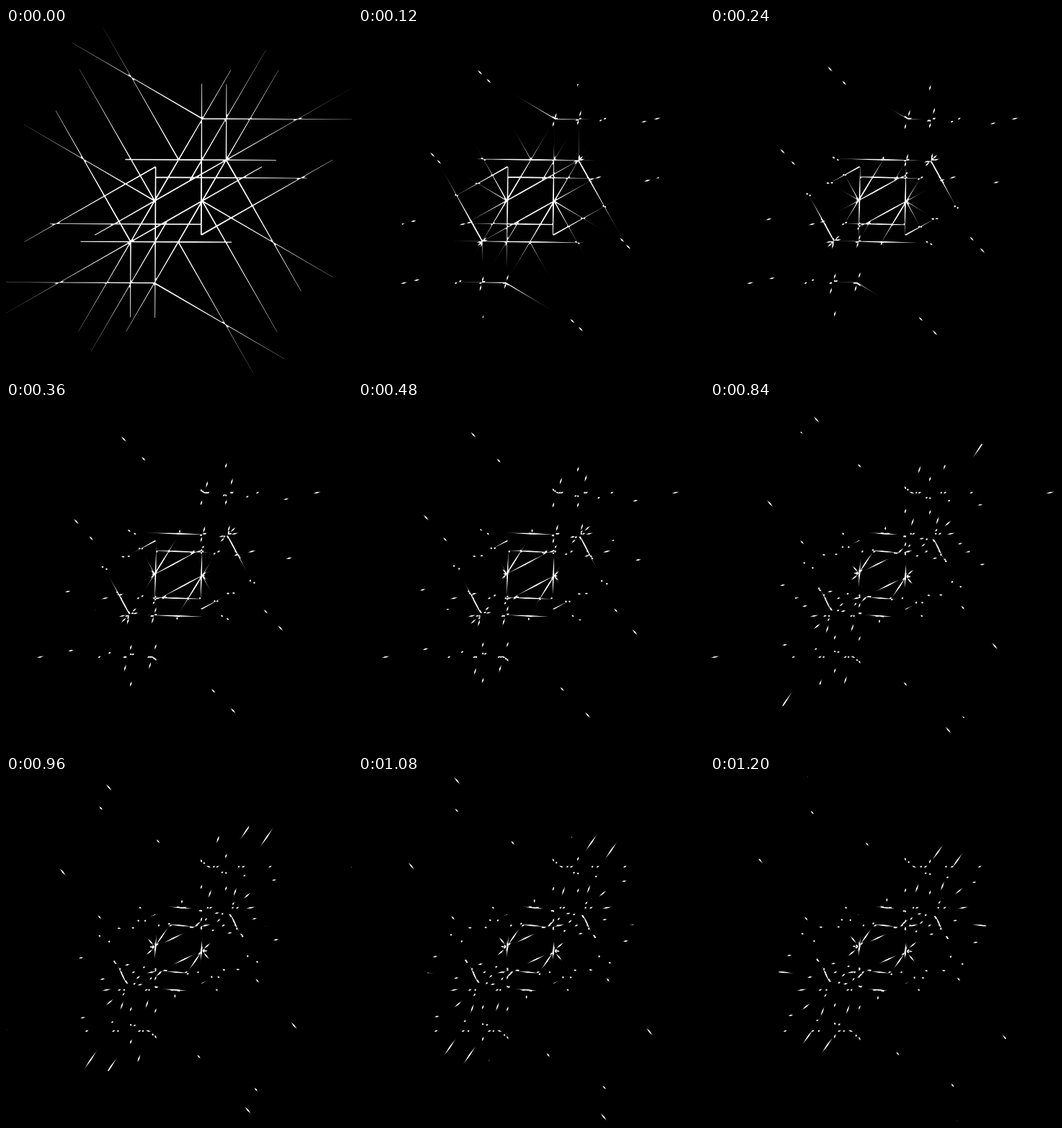
Recreate the animation shown at these times as an HTML page with a canvas. Size 480 by 480 pixels, loop 1260 ms.

```html
<!DOCTYPE html>
<html>
<head>
<meta charset="utf-8">
<style>
  html, body { margin: 0; width: 100%; height: 100%; overflow: hidden; background: #000; }
  canvas { display: block; width: 480px; height: 480px; }
</style>
</head>
<body>
<canvas id="stage" width="480" height="480"></canvas>
<script>
const SIZE = 480, STEP_MS = 60, STEPS = 21;
const CENTER_X = 239.2, CENTER_Y = 239.8;
const LINE_WIDTH = 2.1;
const REACH = 210;              // length of every spoke
const U = 33, H = 57;           // half side and height of the triangular lattice
const SPOKE_ANGLE = Math.PI / 6;

const figure = new Path2D();

// Adds spokes from one point, each direction counted in twelfths of a turn,
// together with their twins turned by half a turn.
function fan(x, y, directions, length = REACH) {
  for (const direction of directions) {
    const endX = x + length * Math.cos(direction * SPOKE_ANGLE);
    const endY = y + length * Math.sin(direction * SPOKE_ANGLE);
    for (const side of [1, -1]) {
      figure.moveTo(side * x, side * y);
      figure.lineTo(side * endX, side * endY);
    }
  }
}

// Hubs on the lattice
fan(-U, 0, [4, 7, 8, 10]);
fan(0, -H, [8]);
fan(2 * U, -H, [2, 5, 11]);
fan(2 * U, -H, [9], REACH / 2);
fan(U, -2 * H, [0, 7]);

// Inner frame and the long bars crossing it
const inner = U - 1.2;
fan(-inner, -47.2, [3, 5]);
fan(-inner, -inner - 0.6, [0]);
fan(U / 2 - 1, -H / 2 + 0.6, [10]);
fan(-2.25 * U, -H, [0]);

function makeLayer(canvas) {
  canvas.width = canvas.height = SIZE;
  return canvas.getContext('2d');
}

function drawFigure(ctx, degrees) {
  ctx.resetTransform();
  ctx.globalCompositeOperation = 'source-over';
  ctx.fillStyle = '#000';
  ctx.fillRect(0, 0, SIZE, SIZE);
  ctx.translate(CENTER_X, CENTER_Y);
  ctx.rotate(degrees * Math.PI / 180);
  ctx.strokeStyle = '#fff';
  ctx.lineWidth = LINE_WIDTH;
  ctx.stroke(figure);
  ctx.resetTransform();
}

const stage = makeLayer(document.getElementById('stage'));
const turning = makeLayer(document.createElement('canvas'));

// Only the overlap of the still figure and its turning copy stays lit.
function render(time) {
  const step = Math.floor(time / STEP_MS) % STEPS;
  drawFigure(turning, 0.5 * (step + 1));
  drawFigure(stage, 0);
  stage.globalCompositeOperation = 'multiply';
  stage.drawImage(turning.canvas, 0, 0);
}

const start = performance.now();
function tick() {
  render(performance.now() - start);
  requestAnimationFrame(tick);
}
tick();
</script>
</body>
</html>
```
